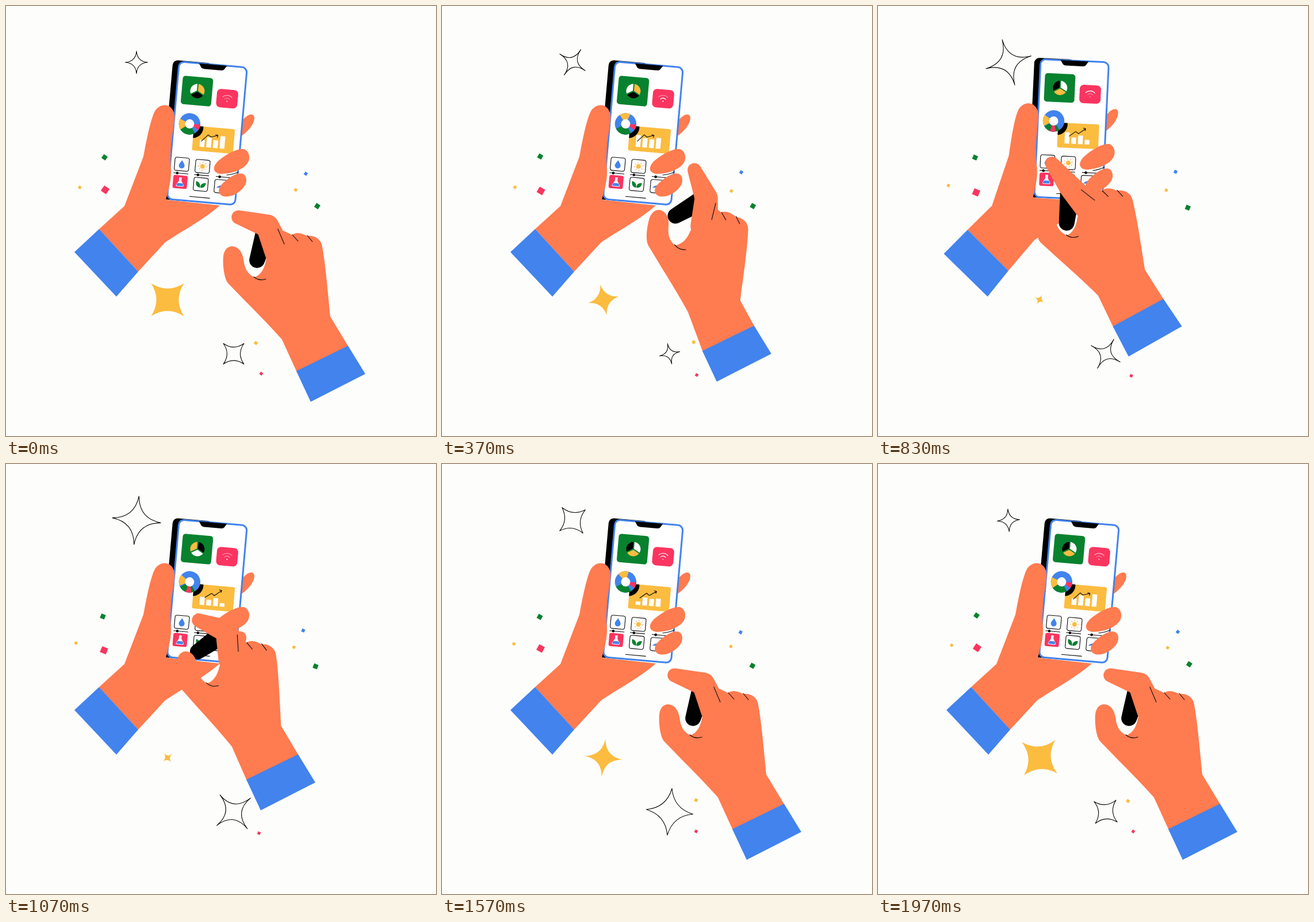
An HTML page for the animation above (2010 ms loop, 748 by 748 pixels).

```html
<!DOCTYPE html>
<html lang="en">
<head>
<meta charset="utf-8">
<title>Tapping a phone</title>
<style>
  html, body { margin: 0; width: 100%; height: 100%; overflow: hidden; background: #fdfefc; }
  svg { display: block; width: 100vw; height: 100vh; }
  .skin { fill: #ff7b50; }
  .blue { fill: #4283ed; }
  .yellow { fill: #fbbc40; }
  .green { fill: #08822f; }
  .red { fill: #fa3560; }
  .white { fill: #fff; }
  .line { fill: none; stroke: #0a0a0a; stroke-width: 1.1; stroke-linecap: round; stroke-linejoin: round; }
  .wave { fill: none; stroke: #fff; stroke-width: 1.4; stroke-linecap: round; }
</style>
</head>
<body>
<svg viewBox="0 0 748 748">
  <defs>
    <clipPath id="cardClip"><rect x="37" y="110.3" width="71.5" height="43" rx="3"/></clipPath>
  </defs>
  <g id="squares"></g>
  <g id="stars"></g>

  <g id="holder">
    <path class="skin" d="M400 205L414 196C422 187 432 186 432 195C432 206 420 219 411 225L398 232Z"/>
    <g transform="translate(300 95) rotate(5.05)">
      <rect x="-9.5" y="-.5" width="70" height="243" rx="9"/>
      <rect x="1.5" y="1.5" width="118.5" height="240" rx="9" fill="#fff" stroke="#4283ed" stroke-width="3"/>
      <path d="M36 1.5h49l-3 4.5q-2 4.5-7 4.5h-29q-5 0-7-4.5z"/>

      <rect class="green" x="10.2" y="25.2" width="53" height="49.5" rx="5"/>
      <g id="pie" transform="translate(37.5 49.9)"></g>

      <rect class="red" x="71.7" y="42.5" width="37" height="32" rx="7"/>
      <g id="wifi" transform="translate(90.3 63)">
        <circle class="white" r="1.2"/>
        <path class="wave" d="M-4.4-3.6A6 6 0 0 1 4.4-3.6"/>
        <path class="wave" d="M-8-7A11.3 11.3 0 0 1 8-7"/>
      </g>

      <rect class="yellow" x="37" y="110.3" width="71.5" height="43" rx="3"/>
      <circle cx="35" cy="113.4" r="18.5" clip-path="url(#cardClip)"/>
      <g id="bars" class="white"></g>
      <path id="trend" class="line"/>

      <g transform="translate(29 107.9)">
        <circle class="blue" r="18.7"/>
        <path id="wedgeGreen" class="green"/>
        <path id="wedgeRed" class="red"/>
        <path id="wedgeYellow" class="yellow"/>
        <circle class="white" r="8"/>
      </g>

      <g id="tiles"></g>
      <path class="blue" transform="translate(21.7 179)" d="M0-7C2.5-3 5-.5 5 2.5A5 4.8 0 0 1-5 2.5C-5-.5-2.5-3 0-7Z"/>
      <g transform="translate(57.9 179.6)">
        <circle class="yellow" r="4"/>
        <g id="rays" stroke="#fbbc80" stroke-width="1.3" stroke-linecap="round"></g>
      </g>
      <g transform="translate(21.4 210)">
        <path class="white" d="M-2.2-8h4.4v6L6.5 5q1 3-2 3h-9q-3 0-2-3l4.3-7z"/>
        <path class="blue" d="M-4 2h8l2 3q.5 2-1.5 2h-9q-2 0-1.5-2z"/>
      </g>
      <g transform="translate(57.6 211)" class="green">
        <path d="M-1 6C-8 5-9 0-8.5-5C-3-4 0 0-1 6Z"/>
        <path d="M0 6C-1 0 3-3 8.5-3C9 3 5 6 0 6Z"/>
      </g>
      <path class="blue" d="M85 214q5-5 12-5v5z"/>
      <path class="line" d="M40 233.7h35"/>
    </g>
    <path class="line" d="M384 294Q395 293 404 289"/>
    <path class="skin" d="M373 292C358 290 359 278 371 268C387 255 405 247 414 249C424 252 426 267 419 275C410 286 391 292 373 292Z"/>
    <path class="skin" d="M381 331.5C367 329 367 317 379 306.5C392 295 405 289 412 292C420 296 420 308 413 316C404 326 393 332 381 331.5Z"/>
    <path class="skin" d="M162 388L206 348L239 262C245 230 251 200 258 185C264 172 279 169 287 177C293 183 294 192 293 200C290 222 284 250 287 285C288 305 281 325 278 337L372 347C345 371 310 389 277 411L230 462Z"/>
    <path class="blue" d="M119 428L162 388L230 462L192 505.5Z"/>
  </g>

  <path id="curled"/>
  <path id="palm" class="skin"/>
  <path id="finger" class="skin"/>
  <path id="cuff" class="blue"/>
  <path id="creases" class="line"/>
</svg>
<script>
const LOOP = 2010;
const NS = 'http://www.w3.org/2000/svg';
const $ = id => document.getElementById(id);
const rad = deg => deg * Math.PI / 180;
const wave = (t, peak, period = LOOP) => Math.cos(2 * Math.PI * (t - peak) / period);
const pulse = (t, peak, reach) =>
  Math.abs(t - peak) < reach ? Math.cos(Math.PI / 2 * (t - peak) / reach) ** 2 : 0;
const tilt = t => pulse(t, 830, 230);

function add(parent, tag, attrs) {
  const el = document.createElementNS(NS, tag);
  for (const name in attrs) el.setAttribute(name, attrs[name]);
  return parent.appendChild(el);
}
const setPath = (id, d) => $(id).setAttribute('d', d);

// Point at a distance from (x, y); heading 0 is up, clockwise
const polar = (x, y, r, heading) => [x + r * Math.sin(rad(heading)), y - r * Math.cos(rad(heading))];

function wedge(from, to, r) {
  return `M0 0L${polar(0, 0, r, from)}A${r} ${r} 0 ${to - from > 180 ? 1 : 0} 1 ${polar(0, 0, r, to)}Z`;
}

function starPath(x, y, r, turn, fullness) {
  let d = 'M' + polar(x, y, r, turn);
  for (let i = 0; i < 4; i++, turn += 90)
    d += `Q${polar(x, y, r * fullness, turn + 45)} ${polar(x, y, r, turn + 90)}`;
  return d + 'Z';
}

// Outline around two circles joined by their tangents
function taper([x1, y1], r1, [x2, y2], r2) {
  const a = Math.atan2(y2 - y1, x2 - x1), b = Math.acos((r1 - r2) / Math.hypot(x2 - x1, y2 - y1));
  const on = (x, y, r, angle) => `${x + r * Math.cos(angle)} ${y + r * Math.sin(angle)}`;
  return `M${on(x1, y1, r1, a + b)}A${r1} ${r1} 0 ${r1 > r2 ? 1 : 0} 1 ${on(x1, y1, r1, a - b)}` +
    `L${on(x2, y2, r2, a - b)}A${r2} ${r2} 0 ${r2 > r1 ? 1 : 0} 1 ${on(x2, y2, r2, a + b)}Z`;
}

// Maps resting points to a hand turned about a pivot and shifted
function mover(px, py, dx, dy, deg) {
  const c = Math.cos(rad(deg)), s = Math.sin(rad(deg));
  return (x, y) => [px + dx + (x - px) * c - (y - py) * s, py + dy + (x - px) * s + (y - py) * c];
}
const movePath = (d, move) => d.replace(/([\d.]+),([\d.]+)/g, (_, x, y) => move(+x, +y).join(' '));

// Tapping hand: shift, palm turn, headings of knuckle bone, fingertip and curled finger
const REST = [0, 0, 0, -23, -73, 197];
const POSES = [
  [0, REST],
  [370, [-52, -35, 13, -9, -36, 227]],
  [830, [-97.5, -79.5, -3.5, -38, -34.5, 190]],
  [1070, [-87, -86, 2.5, -13, -71, 233]],
  [1370, [-56, -29.5, 1, -19, -70, 212]],
  [1565, REST],
  [LOOP, REST]
];

// Monotone cubic interpolation through the poses
function handPose(t) {
  const i = POSES.findLastIndex(([time]) => time <= t);
  const [t0, from] = POSES[i], [t1, to] = POSES[i + 1];
  const span = t1 - t0, u = (t - t0) / span;
  const slope = (k, n) => {
    if (k === 0 || k === POSES.length - 1) return 0;
    const [[ta, a], [, b], [tc, c]] = POSES.slice(k - 1, k + 2);
    return (b[n] - a[n]) * (c[n] - b[n]) <= 0 ? 0 : (c[n] - a[n]) / (tc - ta);
  };
  return from.map((v, n) =>
    v * (1 + 2 * u) * (1 - u) ** 2 + to[n] * u * u * (3 - 2 * u) +
    span * (slope(i, n) * u * (1 - u) ** 2 + slope(i + 1, n) * u * u * (u - 1)));
}

const SQUARES = [
  { tone: 'green', side: 8, x: 170, y: 264, sway: 1.5 },
  { tone: 'yellow', side: 5, x: 125, y: 313.5, sway: 3.3 },
  { tone: 'red', side: 11, x: 171.5, y: 322, sway: 1 },
  { tone: 'blue', side: 5.5, x: 519.3, y: 290.5, sway: 2.3 },
  { tone: 'yellow', side: 5, x: 502.5, y: 319.5, sway: 1.5 },
  { tone: 'green', side: 8, x: 540, y: 350, sway: 1.5 },
  { tone: 'yellow', side: 5.5, x: 442, y: 584, sway: -7.5 },
  { tone: 'red', side: 5, x: 442, y: 641, sway: 2 }
];
for (const s of SQUARES)
  s.el = add($('squares'), 'rect', { class: s.tone, x: -s.side / 2, y: -s.side / 2, width: s.side, height: s.side });

// big and full: when each star is largest and roundest
const STARS = [
  { tone: 'line', x: 227, y: 98, size: 31, swell: 11.5, big: 1005, full: 1500, turn: 0 },
  { tone: 'yellow', x: 281, y: 511, size: 26, swell: 15.5, big: 1905, full: 50, turn: 45 },
  { tone: 'line', x: 396, y: 605, size: 30.5, swell: 12.5, big: 1375, full: 1750, turn: 45 }
];
for (const s of STARS) s.el = add($('stars'), 'path', { class: s.tone });

const slices = [300, 60, 180].map(mid => add($('pie'), 'path', { d: wedge(mid - 60, mid + 60, 12.5) }));
add($('pie'), 'path', { d: 'M0 0V-13M0 0L11.3 6.5M0 0L-11.3 6.5', stroke: '#08822f', 'stroke-width': 2 });
const bars = [8, 4, 1.5, 8].map((swing, i) =>
  ({ swing, peak: i % 2 ? 70 : 570, el: add($('bars'), 'rect', { x: 49.5 + i * 11.7, width: 8.3 }) }));
[[21.7, 179], [57.9, 179.6], [21.4, 210], [57.6, 211], [94, 211.5]].forEach(([x, y], i) =>
  add($('tiles'), 'rect', { class: i === 2 ? 'red' : 'line', x: x - 12.5, y: y - 11.5, width: 25, height: 23, rx: 3.5 }));
for (const x of [9, 45, 83]) {
  add($('tiles'), 'path', { class: 'line', d: `M${x} 195h25` });
  add($('tiles'), 'circle', { cx: x + 6.2, cy: 195, r: 2.3 });
}
for (let a = 0; a < 360; a += 45) add($('rays'), 'path', { d: 'M0-6V-7.6', transform: `rotate(${a})` });

function drawScreen(t) {
  const step = [0, 1, 2, 1][Math.floor(t / 500) % 4];
  const tones = ['#fff', '#fbbc40', '#000'];
  slices.forEach((s, i) => s.setAttribute('fill', tones[(i - step + 3) % 3]));

  [250, 430, 720].forEach((peak, i) =>
    $('wifi').children[i].setAttribute('opacity', .65 + .35 * wave(t, peak, 1000)));

  for (const { el, swing, peak } of bars) {
    const height = 14 + swing * wave(t, peak);
    el.setAttribute('height', height);
    el.setAttribute('y', 146 - height);
  }
  const rise = Math.min(1, Math.max(0, .5 - .7 * wave(t, 150)));
  setPath('trend', `M${52 + 6 * rise} ${136 - 3.5 * rise}l11-${12 - 4 * rise}l5 3.5` +
    `l12-${4 + 6 * rise}m-4-.8l4 .8l-1 3.5`);

  const yellow = 308 + 48 * wave(t, 440, LOOP / 2), red = 104 + 95 * pulse(t, 950, 420);
  setPath('wedgeYellow', wedge(yellow - 30, yellow + 30, 18.7));
  setPath('wedgeRed', wedge(red - 16, red + 16, 18.7));
  setPath('wedgeGreen', wedge(145, 238, 18.7));
  $('rays').setAttribute('transform', `rotate(${t * 180 / LOOP})`);

  $('holder').setAttribute('transform', `translate(${-tilt(t)} 0) rotate(${-2.35 * tilt(t)} 191 515)`);
}

function drawHand(t) {
  const [dx, dy, palmTurn, boneTurn, tipTurn, curlTurn] = handPose(t);
  const cuffAt = mover(550, 613, dx, dy, -2.5 * tilt(t));
  const palmAt = mover(535, 574, dx, dy, palmTurn);
  setPath('cuff', movePath('M505,635L595,591L625,640L530,688.5Z', cuffAt));
  setPath('palm', 'M' + cuffAt(506, 637) + movePath(
    'L480,580Q455,552 416,513L386,482C378,472 377,445 378,436C379,424 386,418 393,418' +
    'C404,418 411,428 413,440C415,457 420,466 432,472C444,468 450,455 452,443L470,400L474,388' +
    'Q484,391 497,398C507,392 516,396 524,400C536,398 548,405 550,418C556,450 560,500 564,540', palmAt) +
    'L' + cuffAt(596, 593) + 'Z');

  const root = [474, 428];
  const joint = polar(...root, 49, boneTurn);
  const tip = polar(...joint, 53, tipTurn);
  const curl = polar(...joint, 62, curlTurn);
  const jointAt = palmAt(...joint);
  setPath('finger', taper(palmAt(...tip), 12, jointAt, 20) + taper(jointAt, 20, palmAt(...root), 24));
  setPath('curled', taper(palmAt(...curl), 13.5, jointAt, 18));
  setPath('creases', `M${palmAt(joint[0] + 18, joint[1] + 5)}L${palmAt(484, 414)}` +
    movePath('M498,398L508,409M524,399L533,410M431,471Q440,479 452,475', palmAt));
}

function drawSparkles(t) {
  for (const s of STARS)
    s.el.setAttribute('d', starPath(s.x, s.y, s.size + s.swell * wave(t, s.big),
      s.turn + t * 180 / LOOP, .1 + .15 * wave(t, s.full)));
  SQUARES.forEach((s, i) => {
    const x = s.x + s.sway * wave(t, 60);
    const y = s.y + 2.3 * wave(t, (250 + 137.5 * i) / 360 * LOOP);
    s.el.setAttribute('transform', `translate(${x} ${y}) rotate(${28 + 6 * wave(t, 0)})`);
  });
}

const start = performance.now();
function tick() {
  const t = (performance.now() - start) % LOOP;
  drawScreen(t);
  drawHand(t);
  drawSparkles(t);
  requestAnimationFrame(tick);
}
tick();
</script>
</body>
</html>
```
